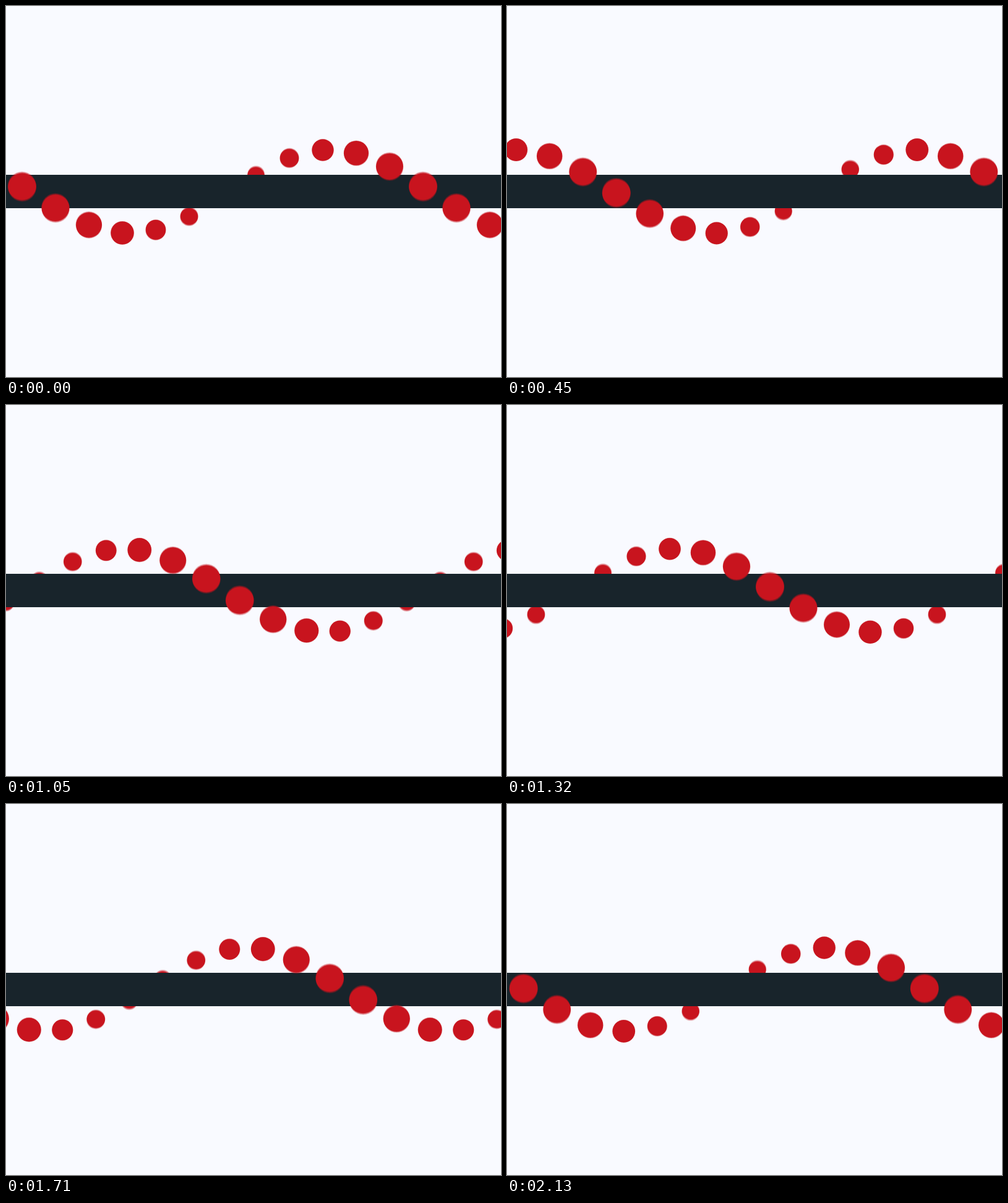
Animation of 800 by 600 pixels, one loop 2160 ms. Source, as an HTML page with a canvas:

```html
<!DOCTYPE html>
<html>
<head>
<meta charset="utf-8">
<style>
html, body { margin: 0; width: 100%; height: 100%; overflow: hidden; background: #f9faff; }
canvas { display: block; }
</style>
</head>
<body>
<canvas id="stage" width="800" height="600"></canvas>
<script>
const LOOP = 2160, STEP = 30, GAP = 54, WAVE = 12 * GAP;
const SAMPLES = 4, SHUTTER = 0.45;
const view = document.getElementById('stage').getContext('2d');
const layer = document.createElement('canvas');
layer.width = 800;
layer.height = 600;
const ctx = layer.getContext('2d');

function balls(p, front) {
  ctx.fillStyle = '#c8141e';
  for (let k = -1; k < 17; k++) {
    const x = 26 + GAP * (k - p);
    const angle = (x - 38.2 - WAVE * p) / WAVE * 2 * Math.PI;
    const depth = Math.cos(angle);
    if (depth > 0 !== front) continue;
    ctx.beginPath();
    ctx.arc(x, 300 + 67.5 * Math.sin(angle), 18.25 + 4.75 * depth, 0, 2 * Math.PI);
    ctx.fill();
  }
}

function scene(p) {
  ctx.fillStyle = '#f9faff';
  ctx.fillRect(0, 0, 800, 600);
  balls(p, false);
  ctx.fillStyle = '#18242b';
  ctx.fillRect(0, 273, 800, 54);
  balls(p, true);
}

// Average several moments around each step for motion blur.
function draw(now) {
  const time = Math.floor((now % LOOP) / STEP) * STEP;
  for (let i = 0; i < SAMPLES; i++) {
    const shift = (i / (SAMPLES - 1) - 0.5) * SHUTTER * STEP;
    scene((time + shift) / LOOP);
    view.globalAlpha = 1 / (i + 1);
    view.drawImage(layer, 0, 0);
  }
}

const start = performance.now();
function tick() {
  draw(performance.now() - start);
  requestAnimationFrame(tick);
}
tick();
</script>
</body>
</html>
```
